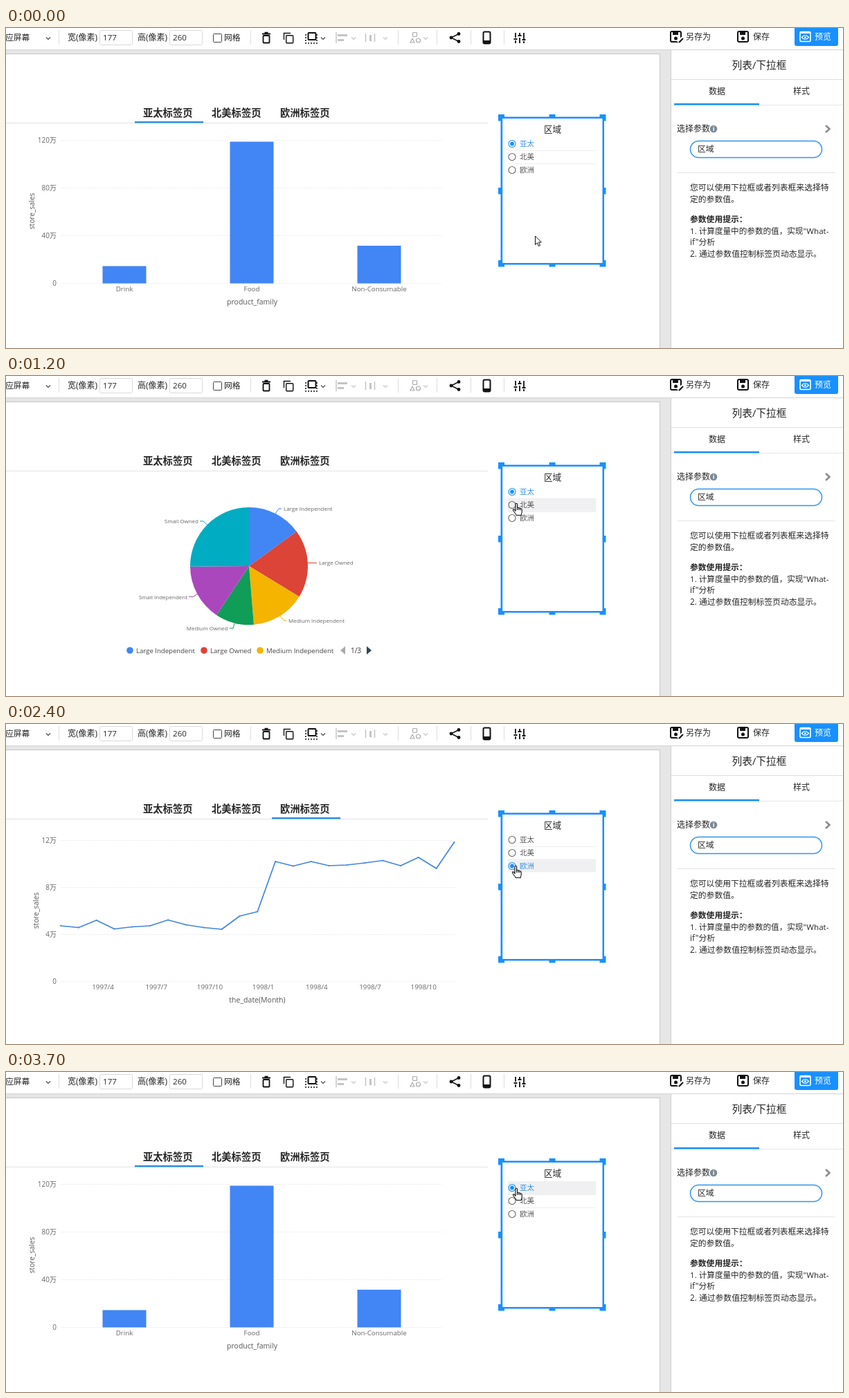
An HTML page with a canvas that plays this animation: 1209x463 px, repeating every 4.75 s.

```html
<!DOCTYPE html>
<html lang="zh-CN">
<head>
<meta charset="utf-8">
<style>
html, body { margin: 0; width: 100%; height: 100%; overflow: hidden; background: #fff; }
canvas { display: block; }
</style>
</head>
<body>
<canvas id="stage" width="1209" height="463"></canvas>
<script>
const ctx = document.getElementById('stage').getContext('2d');
const LOOP = 4750, STEP = 50;
const FONT = '"Open Sans", "Noto Sans CJK SC", "Noto Sans CJK", sans-serif';
const BLUE = '#1890ff', INK = '#262626', GREY = '#666', PALE = '#c4c4c4';
const REGIONS = ['亚太', '北美', '欧洲'];

// [time, value] switches that hold until the next entry
const CHART = [[0, 0], [1200, 1], [2050, 2], [3200, 0]];
const TAB = [[0, 0], [1200, -1], [1300, 1], [2050, -1], [2250, 2], [3150, -1], [3200, 0]];
const RADIO = [[0, 0], [1250, 1], [2200, 2], [3500, 0]];
// [time, x, y] of the pointer tip
const POINTER = [[0, 764, 301], [50, 764, 301], [300, 748, 235], [550, 738, 186], [800, 737, 184],
  [1300, 737, 184], [1450, 737, 195], [1500, 737, 195], [1750, 736, 205], [2500, 736, 205], [2800, 737, 168], [LOOP, 737, 168]];

function text(s, x, y, size, color = INK, align = 'left', weight = 400) {
  ctx.font = `${weight} ${size}px ${FONT}`;
  ctx.fillStyle = color;
  ctx.textAlign = align;
  ctx.fillText(s, x, y);
}
function box(x, y, w, h, color) {
  ctx.fillStyle = color;
  ctx.fillRect(x, y, w, h);
}
function frame(x, y, w, h, r, color, width = 1, fill) {
  ctx.beginPath();
  ctx.roundRect(x, y, w, h, r);
  if (fill) { ctx.fillStyle = fill; ctx.fill(); }
  if (color) { ctx.strokeStyle = color; ctx.lineWidth = width; ctx.stroke(); }
}
function disc(x, y, r, color) {
  ctx.beginPath();
  ctx.arc(x, y, r, 0, 7);
  ctx.fillStyle = color;
  ctx.fill();
}
function ring(x, y, r, color, width = 1) {
  ctx.beginPath();
  ctx.arc(x, y, r, 0, 7);
  ctx.strokeStyle = color;
  ctx.lineWidth = width;
  ctx.stroke();
}
function path(d, color, width = 1, x = 0, y = 0, fill) {
  const p = new Path2D(d);
  ctx.save();
  ctx.translate(x, y);
  if (fill) { ctx.fillStyle = fill; ctx.fill(p); }
  if (color) { ctx.strokeStyle = color; ctx.lineWidth = width; ctx.stroke(p); }
  ctx.restore();
}
const caret = (x, color) => path('M-3-1.5 0 1.5 3-1.5', color, 1.1, x, 15);

function floppy(x) {
  frame(x - 7, 5, 15, 15, 2, '#111', 2);
  box(x - 4, 6, 8, 4, '#111');
  disc(x + .5, 15, 2.5, '#111');
}

function toolbar() {
  box(0, 0, 1209, 31, '#fff');
  box(0, 31, 1209, 1, '#d4d4d4');
  text('应屏幕', -1, 18, 11.8);
  caret(61, '#444');
  for (const x of [76, 353, 566, 622, 671, 719]) box(x, 3, 1, 21, '#ddd');
  text('宽(像素)', 89, 18, 12);
  text('高(像素)', 190, 18, 12);
  frame(135.5, 3.5, 47, 21, 2, '#d9d9d9');
  frame(236.5, 3.5, 47, 21, 2, '#d9d9d9');
  text('177', 140, 18, 11.6);
  text('260', 241, 18, 11.6);
  frame(299.5, 8.5, 12, 12, 1, '#444');
  text('网格', 315, 18, 11.8);

  path('M-6-5.5H6M-2.5-7.3H2.5', '#111', 1.8, 376, 14);
  frame(371.5, 11, 9, 10.5, 1, '#111', 1.8);
  path('M-6.5 3V-6.5H3', '#111', 1.4, 408, 14);
  frame(404.7, 10.7, 10, 11, 1, '#111', 1.4);
  frame(436.5, 7, 11, 10, 1, '#111', 2);
  ctx.setLineDash([2, 2]);
  path('M-8-5V8H8V-7', '#111', 1.5, 441, 14);
  ctx.setLineDash([]);
  caret(458, '#444');

  path('M-7-8V8', PALE, 1.5, 484, 14);
  box(479, 9, 14, 3, PALE);
  box(479, 16, 9, 3, PALE);
  caret(502, PALE);
  path('M-6.5-6V6M6.5-6V6', PALE, 1.5, 526, 14);
  box(525, 10, 3, 9, PALE);
  caret(548, PALE);
  frame(587.5, 6.5, 6, 6, 1, '#aaa', 1.2);
  ring(595.5, 18, 3, '#aaa', 1.2);
  path('M-7 7-4 1-1 7Z', '#aaa', 1.2, 591, 14);
  caret(606, PALE);

  path('M5-5-5 0 5 5', '#111', 1.5, 648, 14);
  for (const [x, y] of [[654, 8.5], [643, 14], [654, 19.5]]) disc(x, y, 2.4, '#111');
  frame(689.5, 5.5, 10, 17, 2, '#111', 2);
  box(690, 18, 9, 4, '#111');
  path('M-6-7V0M-6 4V8M0-7V-3M0 0V8M6-7V2M6 5V8M-8.5 2H-3.5M-2.5-3H2.5M3.5 3H8.5', '#111', 1.8, 742, 14);

  floppy(967);
  path('M0 0 7-7', '#fff', 5, 971, 21);
  path('M0 0 6-6', '#111', 2, 972, 21);
  text('另存为', 982, 16.5, 12);
  floppy(1064);
  text('保存', 1079, 16.5, 12);
  frame(1139, -4, 63, 30, 3, null, 0, BLUE);
  frame(1147, 5.5, 15, 14, 1.5, '#fff', 1.6);
  box(1147, 5, 15, 3, '#fff');
  path('M-5 0Q0-6 5 0Q0 6-5 0Z', '#fff', 1.2, 1154.5, 13.5);
  disc(1154.5, 13.5, 1.5, '#fff');
  text('预览', 1168, 16.5, 12, '#fff');
}

function sidePanel() {
  box(960, 32, 249, 431, '#fff');
  box(960, 32, 1, 431, '#cfcfcf');
  text('列表/下拉框', 1088, 59, 14.7, INK, 'center');
  box(961, 74, 248, 1, '#ddd');
  text('数据', 1027, 95.5, 12, INK, 'center');
  text('样式', 1149, 95.5, 12, INK, 'center');
  box(961, 111, 248, 1, '#e6e6e6');
  box(965, 109, 123, 2.5, BLUE);
  text('选择参数', 969, 150, 12);
  disc(1022, 146, 5.3, '#7b8a97');
  text('i', 1022, 149, 9, '#fff', 'center', 700);
  path('M-3-5 2.5 0-3 5', '#8c8c8c', 2.6, 1187, 146);
  frame(988.5, 163.5, 190, 24, 12, '#2e95ee', 1.5);
  text('区域', 999, 178.5, 11.8);
  box(969, 209, 229, 1, '#e4e4e4');
  text('您可以使用下拉框或者列表框来选择特', 988, 234.5, 11.8);
  text('定的参数值。', 988, 251.5, 11.8);
  text('参数使用提示：', 988, 280.5, 11.8, INK, 'left', 700);
  text('1. 计算度量中的参数的值，实现"What-', 988, 298, 11.6);
  text('if"分析', 988, 314, 11.8);
  text('2. 通过参数值控制标签页动态显示。', 988, 330.5, 11.8);
}

function tabs(active) {
  box(0, 137, 696, 1, '#e2e2e2');
  REGIONS.forEach((r, i) => text(r + '标签页', 198 + 99 * i, 127.5, 14.3, INK, 'left', 700));
  if (active >= 0) box(186 + 99 * active, 135, 99, 2.5, '#2f8fe8');
}

function axes(top, gap, right, labels, yTitle, xTitle) {
  ctx.setLineDash([2, 1]);
  labels.forEach((s, i) => {
    const y = top + gap * i;
    path(`M79 ${y + .5}H${right}`, '#eee');
    text(s, 73, y + 3.7, 10, GREY, 'right');
  });
  ctx.setLineDash([]);
  const [name, x, y] = yTitle;
  ctx.save();
  ctx.translate(x, y);
  ctx.rotate(-Math.PI / 2);
  text(name, 0, 3.5, 10.2, '#555', 'center');
  ctx.restore();
  text(...xTitle, 10.5, '#555', 'center');
}

function barChart() {
  axes(162, 69, 630, ['120万', '80万', '40万', '0'], ['store_sales', 37, 265], ['product_family', 355.5, 399.5]);
  [['Drink', 344.5], ['Food', 164.5], ['Non-Consumable', 315]].forEach(([name, top], i) => {
    const x = 171 + 184 * i;
    box(x - 31.5, top, 63, 369.5 - top, '#4285f4');
    text(name, x, 380.5, 9.75, GREY, 'center');
  });
}

function lineChart() {
  axes(168, 68, 648, ['12万', '8万', '4万', '0'], ['store_sales', 43, 270], ['the_date(Month)', 363, 402.5]);
  const ys = [292, 294.5, 284, 296.5, 293.5, 292, 283.5, 290.5, 294.5, 297, 278, 271.5,
    199, 205.5, 199, 205, 204, 201, 197.5, 205, 193, 209, 171];
  ctx.lineJoin = 'round';
  path('M' + ys.map((y, i) => `${79 + i * 25.84} ${y}`).join('L'), '#4285e0', 1.7);
  ctx.lineJoin = 'miter';
  ys.forEach((y, i) => disc(79 + i * 25.84, y, 1.1, '#4285e0'));
  ['1997/4', '1997/7', '1997/10', '1998/1', '1998/4', '1998/7', '1998/10'].forEach((s, i) =>
    text(s, 140 + 77.2 * i, 383.5, 9.8, GREY, 'center'));
}

// name, end angle, colour, leader line, label x, label y, align
const SLICES = [
  ['Large Independent', 53.9, '#4285f4', 'M389 199 394 192H398', 401, 195, 'left'],
  ['Large Owned', 121.4, '#db4437', 'M436 270.5H449', 452, 273, 'left'],
  ['Medium Independent', 175.3, '#f4b400', 'M396 347 401 353.5H405', 408, 356.5, 'left'],
  ['Medium Owned', 213.5, '#0f9d58', 'M330 358 328 365H323', 320.5, 368, 'right'],
  ['Small Independent', 269.5, '#ab47bc', 'M277 315 270 319.5H264', 262, 322.5, 'right'],
  ['Small Owned', 360, '#00acc1', 'M291 216 285 210H280', 278, 213, 'right']
];
function pieChart() {
  let from = 0;
  for (const [name, to, color, leader, x, y, align] of SLICES) {
    ctx.beginPath();
    ctx.moveTo(351, 275);
    ctx.arc(351, 275, 85, (from - 90) * Math.PI / 180, (to - 90) * Math.PI / 180);
    ctx.fillStyle = color;
    ctx.fill();
    path(leader, color);
    text(name, x, y, 8, GREY, align);
    from = to;
  }
  [179, 286, 367].forEach((x, i) => {
    disc(x, 397, 4.8, SLICES[i][2]);
    text(SLICES[i][0], x + 9, 400.5, 9.6, '#444');
  });
  path('M490 391V403L483 397Z', null, 0, 0, 0, '#aaa');
  text('1/3', 505.5, 400.5, 10, '#333', 'center');
  path('M521 391V403L528 397Z', null, 0, 0, 0, '#2f4554');
}

function listBox(active, hover, dot) {
  for (const y of [125, 231, 336])
    for (const x of [711, 784.5, 857.5])
      if (y !== 231 || x !== 784.5) box(x, y, 9, 9.5, BLUE);
  box(714.5, 128.5, 149.5, 214, BLUE);
  box(717.2, 131, 144.3, 209, '#fff');
  text('区域', 789.5, 150.5, 12.6, INK, 'center');
  box(725, 177, 127, 1, '#eee');
  box(725, 196, 127, 1, '#eee');
  if (hover >= 0) box(725, 158 + 18.7 * hover, 127, 19, '#f0f0f2');
  REGIONS.forEach((r, i) => {
    const y = 167.5 + 19 * i, on = i === active;
    ring(731, y, 5, on ? BLUE : '#666', 1.1);
    if (on) disc(731, y, 2.9 * dot, BLUE);
    text(r, 742, y + 3.7, 10.5, on ? '#2f8fe8' : '#555');
  });
}

function tooltip(alpha) {
  if (alpha <= 0) return;
  ctx.save();
  ctx.globalAlpha = alpha;
  ctx.shadowColor = 'rgba(0,0,0,.2)';
  ctx.shadowBlur = 14;
  ctx.shadowOffsetY = 3;
  frame(712, 122, 39, 29, 2, null, 0, '#505052');
  ctx.shadowColor = 'transparent';
  path('M727 151H735L731 155Z', null, 0, 0, 0, '#505052');
  text('亚太', 731, 141.5, 13.1, '#fff', 'center');
  ctx.restore();
}

function pointer(x, y, hand) {
  ctx.lineJoin = 'round';
  if (hand)
    path('M4 11.4V1.8C4-.2 6.6-.2 6.6 1.8V7c.6-.9 2-.7 2.3.3 .7-.7 1.9-.4 2.2.6 .8-.5 2.1 0 2.1 1.3V13c0 1.5-1 2-1 4.5H5.2C5 15.5 1.5 13 .5 10.4 0 9 1.6 8.2 2.6 9.6ZM6.6 7V10M8.9 7.5V10M11.1 8.2V10.2',
      '#111', 1.1, x - 5, y, '#fff');
  else
    path('M0 0V12.5L2.9 9.8 4.9 14.5 7 13.6 5 9H8.8Z', '#111', 1, x + .5, y, '#fff');
  ctx.lineJoin = 'miter';
}

const clamp = v => Math.max(0, Math.min(1, v));
const held = (track, t) => track.filter(k => k[0] <= t).pop();
function pointerAt(t) {
  const i = Math.max(1, POINTER.findIndex(k => k[0] > t));
  const [t0, x0, y0] = POINTER[i - 1], [t1, x1, y1] = POINTER[i];
  const p = clamp((t - t0) / (t1 - t0));
  return [x0 + (x1 - x0) * p, y0 + (y1 - y0) * p];
}

function draw(t) {
  box(0, 0, 1209, 463, '#e6e6e6');
  box(0, 37, 945, 426, '#c8c8c8');
  box(0, 38, 944, 425, '#fff');
  toolbar();
  sidePanel();
  tabs(held(TAB, t)[1]);
  [barChart, pieChart, lineChart][held(CHART, t)[1]]();

  const [x, y] = pointerAt(t);
  const hover = y < 214 ? Math.floor((y - 158) / 18.8) : -1;
  const [since, active] = held(RADIO, t);
  listBox(active, hover, since ? clamp((t - since + 50) / 200) : 1);
  tooltip(Math.min(clamp((t - 3000) / 150), clamp((3500 - t) / 150)));
  pointer(x, y, hover >= 0);
}

function tick() {
  const t = performance.now() % LOOP;
  draw(Math.floor(t / STEP) * STEP);
  requestAnimationFrame(tick);
}
tick();
</script>
</body>
</html>
```
